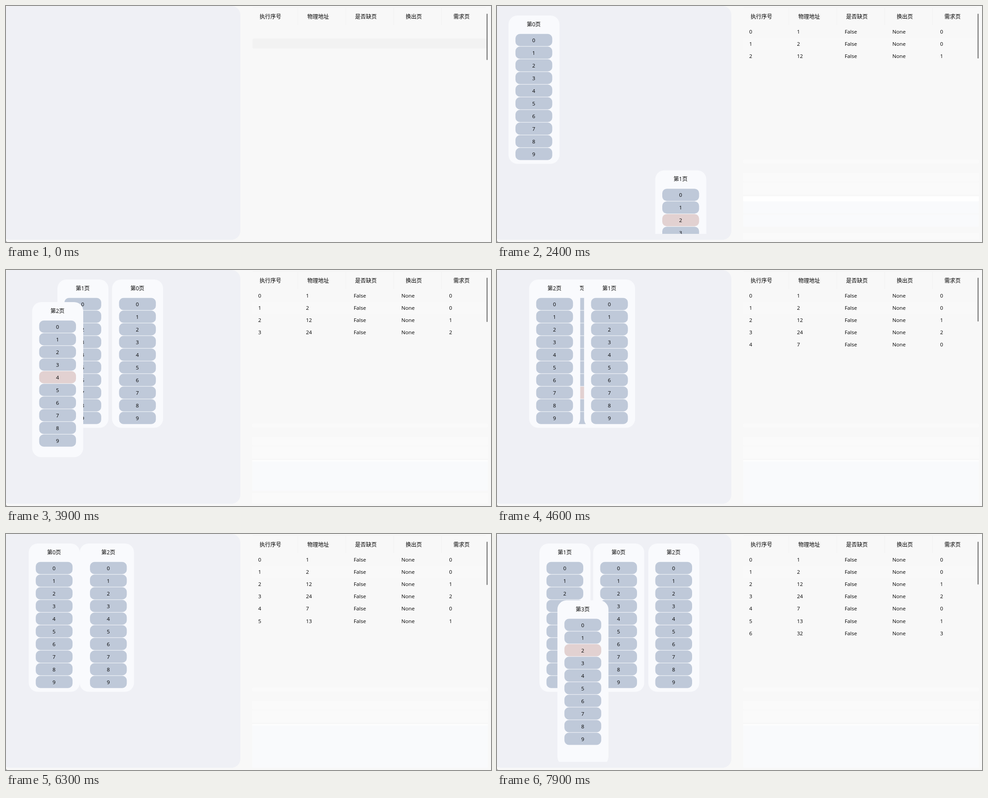
An HTML page that plays this animation: 1074 px wide and 522 px high, repeating every 8000 ms.

```html
<!DOCTYPE html>
<html lang="zh-CN">
<head>
<meta charset="utf-8">
<style>
  html, body { margin: 0; width: 100%; height: 100%; overflow: hidden; background: #f8f8f8; }
  svg { display: block; }
  text { font: 11.6px "Open Sans", "Noto Sans", "Noto Sans CJK SC", "Noto Sans CJK", sans-serif; fill: #000; }
  .cjk { font-size: 12px; font-family: "Open Sans", "Noto Sans CJK SC", "Noto Sans CJK", sans-serif; }
  .mid { text-anchor: middle; }
</style>
</head>
<body>
<svg id="stage" width="1074" height="522" viewBox="0 0 1074 522">
  <clipPath id="listArea"><rect width="519" height="504"/></clipPath>
  <rect x="-11" width="530" height="517" rx="20" fill="#eff0f5"/>
  <path d="M0 518Q0 522 4 522H0Z" fill="#999"/>
  <g id="cards" clip-path="url(#listArea)"></g>
  <g id="table"></g>
</svg>
<script>
const LOOP = 8000, STEP = 100, MOVE = 1150, ENTER = 400;
const BUTTON = '#bfc9d9', ACTIVE = '#e2d1d1';

// Each access: start time, address, card positions it leads to (by page).
const accesses = [
  { at: 534, address: 1, x: [8] },
  { at: 1460, address: 2, x: [8] },
  { at: 2342, address: 12, x: [129, 8] },
  { at: 3325, address: 24, x: [250, 129, 8] },
  { at: 4343, address: 7, x: [8, 249, 127] },
  { at: 6143, address: 13, x: [127, 8, 249] },
  { at: 7532, address: 32, x: [252.5, 133.5, 374.5, 8] },
];

// Pale bands under the table: first access, end access, then [top, bottom, colour].
const bandSets = [
  [1, 3, [[340, 348], [376, 386], [407, 417], [421, 449, '#fff'], [449, 455], [479, 488]]],
  [3, 4, [[340, 348], [369, 388], [390, 417], [421, 432, '#fff'], [432, 459, '#f9fafc'], [461, 488, '#f9fafc'], [502, 517]]],
  [4, 5, [[340, 348], [369, 388], [390, 417], [421, 423.5, '#fff'], [423.5, 488, '#f9fafc'], [493, 517]]],
  [5, 9, [[340, 348], [369, 388], [390, 417], [421, 423.5, '#fff'], [423.5, 517, '#f9fafc']]],
];

function add(parent, tag, attrs, content) {
  const node = document.createElementNS('http://www.w3.org/2000/svg', tag);
  for (const key in attrs) node.setAttribute(key, attrs[key]);
  if (content !== undefined) node.textContent = content;
  return parent.appendChild(node);
}
const show = (node, visible) => node.setAttribute('display', visible ? 'inline' : 'none');

const cardLayer = document.getElementById('cards');
const table = document.getElementById('table');

const cards = [0, 1, 2, 3].map(page => {
  const group = add(cardLayer, 'g');
  const body = add(group, 'rect', { width: 113, rx: 20, fill: '#f9fafd' });
  add(group, 'text', { x: 56, y: 24, class: 'cjk mid' }, `第${page}页`);
  const buttons = Array.from({ length: 10 }, (_, i) => {
    const button = add(group, 'rect', { x: 15.5, y: 40.7 + 28 * i, width: 81.5, height: 27, rx: 10 });
    add(group, 'text', { x: 56, y: 59 + 28 * i, class: 'mid' }, i);
    return button;
  });
  return { group, body, buttons };
});

const idleBand = add(table, 'rect', { x: 546, y: 72, width: 521, height: 22, rx: 3, fill: '#f2f2f2' });
const rowBand = add(table, 'rect', { x: 545, y: 71, width: 522, height: 27, fill: '#f9f9f9' });
const bandGroups = bandSets.map(([from, to, list]) => {
  const group = add(table, 'g');
  for (const [top, bottom, fill = '#fafafa'] of list)
    add(group, 'rect', { x: 545, y: top, width: 522, height: bottom - top, rx: 1, fill });
  return { group, from, to };
});

add(table, 'path', {
  d: 'M546 3.5H1062M646.5 3V42M752.5 3V42M858.5 3V42M964.5 3V42',
  stroke: '#f2f2f2', fill: 'none',
});
['执行序号', '物理地址', '是否缺页', '换出页', '需求页'].forEach((title, i) =>
  add(table, 'text', { x: 585.5 + 105.8 * i, y: 28, class: 'cjk mid' }, title));

const rows = accesses.map(({ address }, i) => {
  const row = add(table, 'g');
  [i, address, 'False', 'None', Math.floor(address / 10)].forEach((value, column) =>
    add(row, 'text', { x: 558.5 + 105.7 * column, y: 61 + 27.1 * i }, value));
  return row;
});
const scrollbar = add(table, 'rect', { x: 1064, y: 17, width: 2.6, rx: 1.2, fill: '#868686' });

function drawCards(time, count) {
  const current = accesses[count - 1];
  const before = count > 1 ? accesses[count - 2].x : [];
  const rest = current ? (1 - Math.min(1, (time - current.at) / MOVE)) ** 3 : 0;
  cards.forEach(({ group, body, buttons }, page) => {
    const target = current && current.x[page];
    show(group, target !== undefined);
    if (target === undefined) return;
    const entering = before[page] === undefined;
    const drop = entering ? ENTER * rest : 0;
    const x = entering ? target + drop : target + (before[page] - target) * rest;
    group.setAttribute('transform', `translate(${x} ${21 + drop})`);
    body.setAttribute('height', 328 + 0.3 * drop);
    buttons.forEach((button, i) =>
      button.setAttribute('fill', page * 10 + i === current.address ? ACTIVE : BUTTON));
  });
}

function draw(time) {
  const count = accesses.filter(access => access.at <= time).length;
  drawCards(time, count);
  rows.forEach((row, i) => show(row, i < count));
  bandGroups.forEach(({ group, from, to }) => show(group, count >= from && count < to));
  show(idleBand, count === 0);
  show(rowBand, count > 0);
  scrollbar.setAttribute('height', 102.4 - 1.1 * count);
}

const start = performance.now();
function tick() {
  const elapsed = performance.now() - start;
  draw(Math.floor((elapsed + 5) / STEP) * STEP % LOOP);
  requestAnimationFrame(tick);
}
tick();
</script>
</body>
</html>
```
